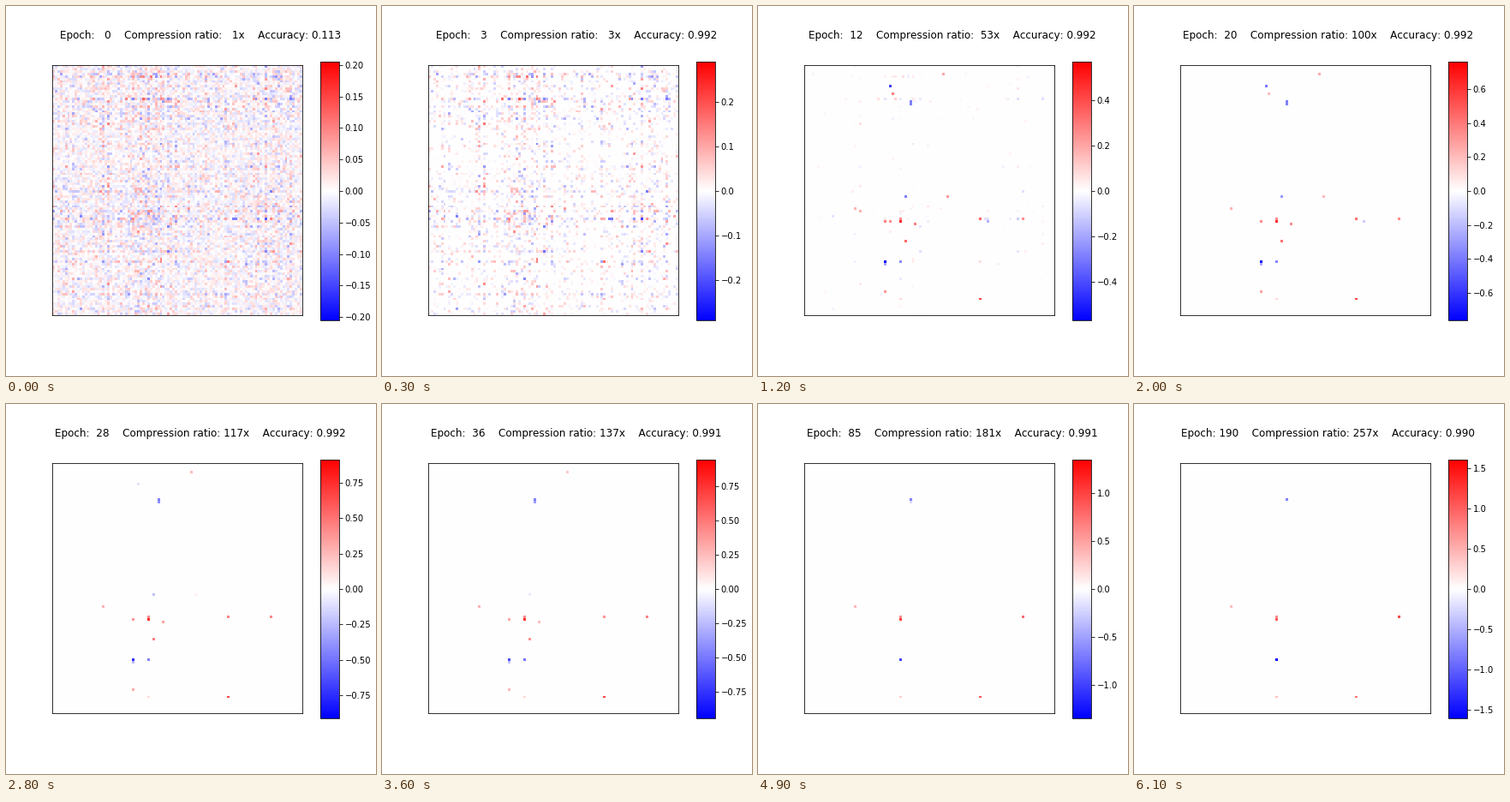
These frames come from a looping animation (432x432 px, 6200 ms). A matplotlib script:

```python
import numpy as np
import matplotlib.pyplot as plt
from matplotlib.animation import FuncAnimation

SIZE, DPI, CELLS = 432, 72, 100
EPOCHS = [*range(40), *range(40, 100, 5), *range(100, 200, 10)]
KNOTS = [0, 6, 12, 20, 26, 36, 85, 190]
RATIOS = [1, 7, 53, 100, 113, 137, 181, 257]
LIMITS = [.2057, .378, .5706, .7624, .905, .945, 1.35, 1.608]
PEAK = 12

# Column, row, share of the colour range at PEAK and at the last epoch
SURVIVORS = [
    (42, 14, -.5, -.5), (20, 57, .3, .25), (38, 61, .45, .45), (38, 62, .85, .65),
    (87, 61, .45, .7), (38, 78, -.45, -1), (38, 93, .15, .25), (70, 93, .75, .55),
]

# Column, row, share at PEAK, epoch of pruning
PRUNED = [
    (42, 15, -.5, 120), (32, 78, -1, 85), (32, 79, -.35, 85), (40, 70, .6, 85),
    (70, 61, .6, 85), (32, 62, .5, 85), (32, 90, .4, 80), (55, 3, .35, 70),
    (44, 63, .5, 60), (40, 52, -.5, 40), (34, 8, -.75, 30), (57, 52, .4, 30),
    (73, 62, -.3, 28), (35, 11, .5, 25), (34, 62, .45, 19), (22, 58, .3, 18),
]

POINTS = [(*p, EPOCHS[-1]) for p in SURVIVORS]
POINTS += [(c, r, peak, 0, end) for c, r, peak, end in PRUNED]


def bands(rng, bumps):
    """Strength of each line: a flat base, some bumps and a random spread."""
    k = np.arange(CELLS)
    gain = 1 + sum(h * np.exp(-((k - c) / w) ** 2) for c, w, h in bumps)
    return gain * np.exp(rng.normal(0, .18, CELLS))


def initial_weights():
    rng = np.random.default_rng(5)
    rows = bands(rng, [(3, 3, .25), (15, 4, .4), (50, 2, .3), (61.5, 1, .5),
                       (78, 1, .3)])
    cols = bands(rng, [(22, .6, .6), (38, 6, .3), (89, 5, .2)])
    noise = rng.normal(.03, 1, (CELLS, CELLS))
    return np.clip(.1 * noise * np.outer(rows, cols), -.65, .65)


START = initial_weights()


def ratio_at(epoch):
    return round(np.exp(np.interp(epoch, KNOTS, np.log(RATIOS))))


def accuracy_at(epoch):
    return .9919 - 1.2e-5 * epoch - .8789 / (1 + epoch) ** 6


def point_at(epoch, start, peak, last, end):
    """Grow to the peak, then ease towards the last value on a log scale."""
    if epoch < PEAK:
        return np.interp(epoch, [0, PEAK / 2, PEAK], [start, .75 * peak, peak])
    u = np.log((1 + epoch) / (1 + PEAK)) / np.log((1 + end) / (1 + PEAK))
    return peak + (last - peak) * min(u, 1) ** 2


def weights_at(epoch):
    # Soft threshold that keeps the share given by the compression ratio
    size = np.abs(START)
    cut = np.quantile(size, 1 - 1 / ratio_at(epoch))
    gain = np.interp(epoch, [0, 6, 12, 18], [1, 1.7, .6, 0])
    grid = np.sign(START) * np.maximum(size - cut, 0) * gain
    for c, r, peak, last, end in POINTS:
        grid[r, c] = point_at(epoch, START[r, c], peak, last, end)
    return grid


plt.rcParams["text.kerning_factor"] = 6
fig = plt.figure(figsize=(SIZE / DPI, SIZE / DPI), dpi=DPI)
ax = fig.add_axes([.125, 71 / SIZE, .675, .675])
ax.set(xticks=[], yticks=[])
image = ax.imshow(START, cmap="bwr", interpolation="nearest")
bar = fig.colorbar(image, cax=fig.add_axes([.85, .15, .05, .7]))
title = fig.text(.525, 394 / SIZE, "", fontsize=12, ha="center", va="baseline")


def draw(frame):
    epoch = EPOCHS[frame]
    limit = np.interp(epoch, KNOTS, LIMITS)
    image.set_data(weights_at(epoch) * limit)
    image.set_clim(-limit, limit)
    title.set_text(f"Epoch: {epoch:3d}    Compression ratio: {ratio_at(epoch):3d}x"
                   f"    Accuracy: {accuracy_at(epoch):.3f}")
    return image, title


anim = FuncAnimation(fig, draw, frames=len(EPOCHS), interval=100, repeat=True,
                     repeat_delay=0, blit=False)
plt.show()
```
